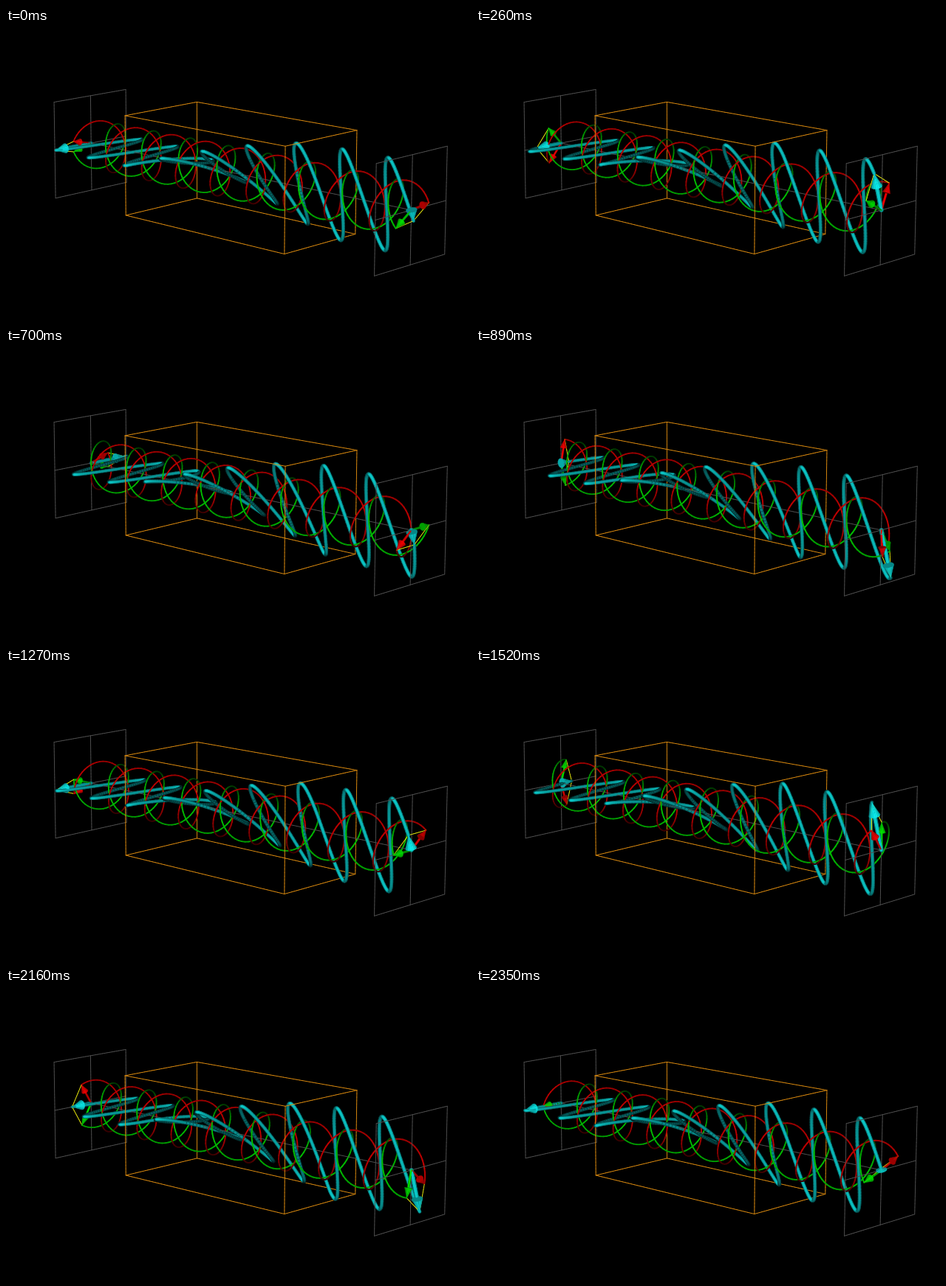
A matplotlib script for the animation above (2.41 s loop, 628 by 396 pixels).

```python
import numpy as np
import matplotlib.pyplot as plt
from matplotlib.animation import FuncAnimation
from matplotlib.collections import PolyCollection

W, H, DPI = 628, 396, 100
PX = 72 / DPI                             # one pixel in points
TICK = 10                                 # ms
LENGTH = 8.3                              # optical axis, in half-heights of a screen
METRIC = np.array([1, 1, LENGTH])
VIEW = np.array([0.70, -0.25, -0.67])     # viewing direction
ENTRY, EXIT = 0.25, 0.75                  # the active medium along the axis
WAVES = 8
EXTRA = {"red": 0.45, "green": 0.05}      # additional waves inside the medium

RED, GREEN, CYAN = (0.74, 0, 0), (0, 0.74, 0), (0.04, 0.78, 0.78)
GREY, ORANGE, YELLOW = (0.31,) * 3, (0.86, 0.54, 0.06), (0.9, 0.9, 0.05)

# ticks each pose is held
HOLDS = [13, 13, 6, 13, 6, 6, 13, 13, 6, 13, 13, 6, 6,
         13, 6, 6, 13, 6, 20, 6, 13, 6, 13, 6, 6]
POSES = np.arange(len(HOLDS))
PHASES = -0.035 + POSES / 12 + 0.04 * (POSES >= 19)

CORNERS = [(-1, 1), (1, 1), (1, -1), (-1, -1)]
SECTIONS = {
    0: [(64, 100), (162, 83), (162, 209), (67, 230)],
    ENTRY: [(161, 118), (258, 100), (258, 230), (162, 254)],
    EXIT: [(377, 160), (474, 138), (473, 279), (376, 306)],
    1: [(501, 183), (597, 160), (593, 306), (498, 336)],
}


def fit_camera():
    """Least-squares projection matrix from the corners of the four sections."""
    rows, rhs = [], []
    for z, pixels in SECTIONS.items():
        for (u, v), (x, y) in zip(CORNERS, pixels):
            p = [u, v, z]
            x, y = x + 0.5, y + 0.5
            rows.append(p + [1] + [0] * 4 + [-x * c for c in p])
            rows.append([0] * 4 + p + [1] + [-y * c for c in p])
            rhs += [x, y]
    m = np.linalg.lstsq(np.array(rows, float), np.array(rhs), rcond=None)[0]
    return np.append(m, 1).reshape(3, 4)


CAMERA = fit_camera()


def project(pts):
    h = np.asarray(pts, float) @ CAMERA[:, :3].T + CAMERA[:, 3]
    return h[:, :2] / h[:, 2:], h[:, 2]


def depth(pts):
    return (np.asarray(pts) * METRIC) @ VIEW


def line(items, a, b, color, pieces=30):
    """Thin straight line, cut up so that it can be sorted by depth."""
    t = np.linspace(0, 1, pieces + 1)[:, None]
    pts = np.array(a) * (1 - t) + np.array(b) * t
    xy, _ = project(pts)
    d = depth(pts)
    for i in range(pieces):
        items.append((d[i:i + 2].mean(), xy[i:i + 2], color, 0.95))


def tube(items, pts, color, width, glossy):
    """Round tube lit from the camera; a glossy one has a bright core."""
    xy, w = project(pts)
    d = depth(pts)
    t = np.diff(pts * METRIC, axis=0)
    t /= np.linalg.norm(t, axis=1)[:, None] + 1e-9
    light = np.clip(1 - (t @ VIEW) ** 2, 0.08, 1) ** 0.7
    for i, k in enumerate(light):
        near, seg = d[i:i + 2].mean(), xy[i:i + 2]
        rgb, lw = np.array(color) * k, width / w[i]
        if glossy:
            items.append((near, seg, rgb * 0.6, lw))
            items.append((near - 0.05, seg, rgb, lw * 0.6))
        else:
            items.append((near, seg, rgb, lw))


def cone(items, tip, e, length, radius, color, sides=14):
    a = np.linspace(0, 2 * np.pi, sides + 1)
    n = np.array([-e[1], e[0], 0])
    axis = np.array([0, 0, 1])
    base = tip - e * length
    radial = lambda ang: np.outer(np.cos(ang), n) + np.outer(np.sin(ang), axis)
    rim = base + radius * radial(a) / METRIC
    normals = radial((a[:-1] + a[1:]) / 2) * length + e * radius
    normals /= np.linalg.norm(normals, axis=1)[:, None]
    for i, k in enumerate(-normals @ VIEW):
        if k > 0:
            tri = np.array([tip, rim[i], rim[i + 1]])
            items.append((depth(tri).mean() - 0.08, project(tri)[0],
                          np.array(color) * (0.45 + 0.55 * k), 0.3))
    if e @ VIEW > 0:
        items.append((depth(rim).mean() - 0.08, project(rim)[0],
                      np.array(color) * (0.3 + 0.6 * (e @ VIEW)), 0.3))


def arrow(items, vec, z, color, width, head, radius):
    size = np.hypot(*vec[:2])
    if size < 0.02:
        return
    e = vec / size
    head_len = min(head, size)
    origin = np.array([0, 0, z])
    if size > head_len:
        t = np.linspace(0, size - head_len, 12)[:, None]
        tube(items, origin + e * t, color, width, True)
    cone(items, origin + vec, e, head_len, radius, color)


def fields(z, phase):
    """The two circular waves at z, as vectors across the axis."""
    z = np.atleast_1d(z)
    inside = np.clip((z - ENTRY) / (EXIT - ENTRY), 0, 1)
    out = []
    for name, sign in (("red", 1), ("green", -1)):
        waves = WAVES * z + EXTRA[name] * inside
        ang = np.pi + sign * 2 * np.pi * (phase - waves)
        out.append(0.5 * np.column_stack([np.cos(ang), np.sin(ang), 0 * z]))
    return out


def frame_lines():
    items = []
    for z in (0, 1):
        for i in range(4):
            line(items, (*CORNERS[i], z), (*CORNERS[i - 1], z), GREY)
        line(items, (-1, 0, z), (1, 0, z), GREY)
        line(items, (0, -1, z), (0, 1, z), GREY)
    line(items, (0, 0, 0), (0, 0, 1), GREY, 90)
    for i in range(4):
        for z in (ENTRY, EXIT):
            line(items, (*CORNERS[i], z), (*CORNERS[i - 1], z), ORANGE)
        line(items, (*CORNERS[i], ENTRY), (*CORNERS[i], EXIT), ORANGE, 50)
    return items


STATIC = frame_lines()


def scene(phase):
    items = list(STATIC)
    z = np.linspace(0, 1, 361)
    for field, color in zip(fields(z, phase), (RED, GREEN)):
        tube(items, field + np.outer(z, [0, 0, 1]), color, 1.75, False)
    z = np.linspace(0, 1, 621)
    tube(items, sum(fields(z, phase)) + np.outer(z, [0, 0, 1]), CYAN, 4.3, True)

    for end in (0, 1):
        r, g = (f[0] for f in fields(end, phase))
        at = np.array([0, 0, end])
        arrow(items, r, end, (0.95, 0, 0), 2.8, 0.18, 0.07)
        arrow(items, g, end, (0, 0.88, 0), 2.8, 0.18, 0.07)
        arrow(items, r + g, end, (0.04, 0.92, 0.92), 5.2, 0.26, 0.10)
        for tip in (r, g):
            line(items, tip + at, r + g + at, YELLOW, 10)

    items.sort(key=lambda item: -item[0])
    _, verts, colors, widths = zip(*items)
    return PolyCollection(verts, closed=False, facecolors=colors, edgecolors=colors,
                          linewidths=np.array(widths) * PX, capstyle="round",
                          visible=False)


fig = plt.figure(figsize=(W / DPI, H / DPI), dpi=DPI, facecolor="black")
ax = fig.add_axes([0, 0, 1, 1])
ax.set_xlim(0, W)
ax.set_ylim(H, 0)
ax.axis("off")

poses = [ax.add_collection(scene(p), autolim=False) for p in PHASES]
timeline = np.repeat(POSES, HOLDS)


def update(tick):
    for i, pose in enumerate(poses):
        pose.set_visible(i == timeline[tick])
    return poses


anim = FuncAnimation(fig, update, frames=len(timeline), interval=TICK,
                     repeat=True, repeat_delay=0, blit=False)
plt.show()
```
